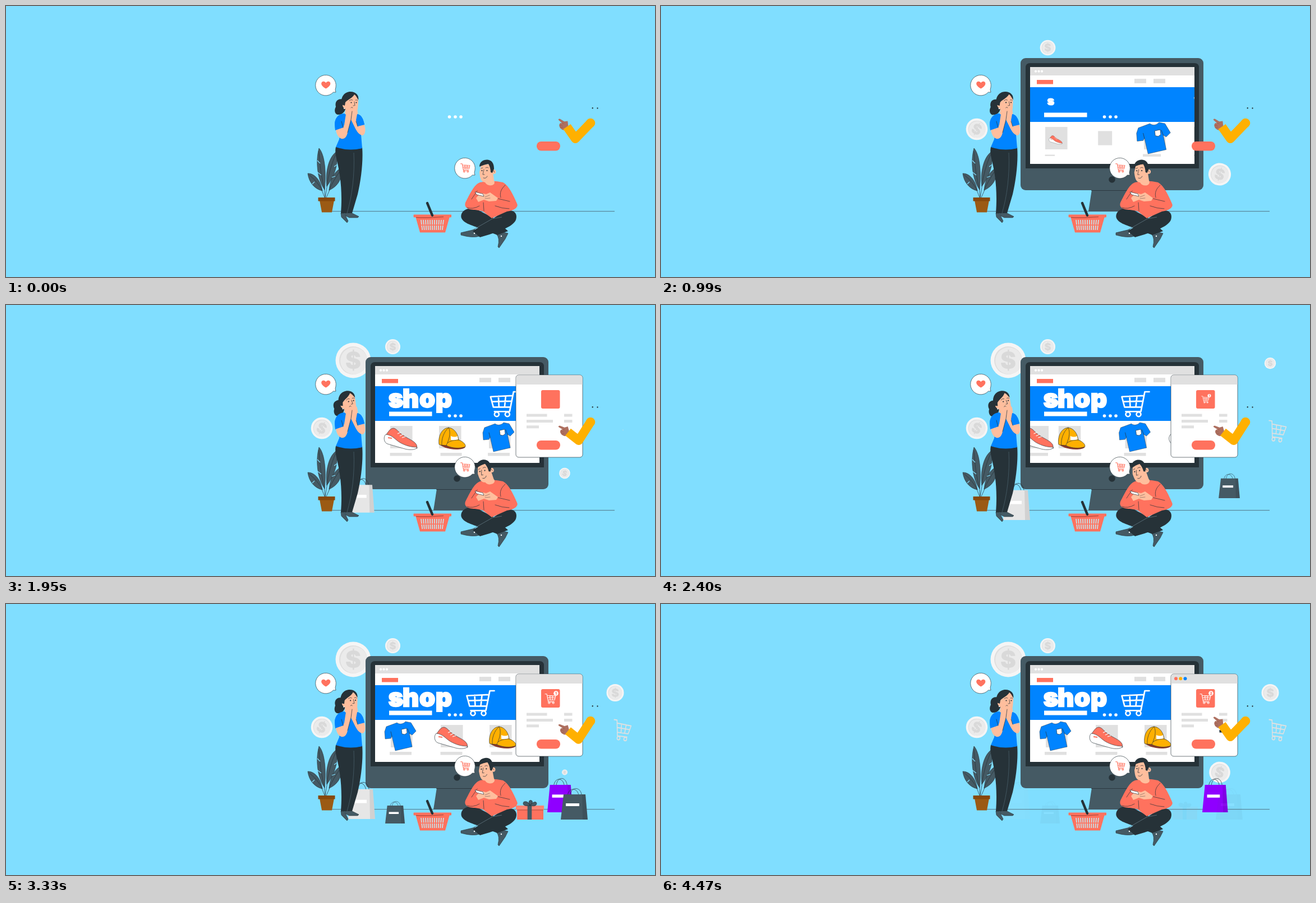
Recreate the animation shown at these times as an HTML page. Size 1157 by 484 pixels, loop 4.5 s.

```html
<!DOCTYPE html>
<html lang="en">
<head>
<meta charset="utf-8">
<title>Online shop</title>
<style>
html, body { margin: 0; width: 100%; height: 100%; overflow: hidden; background: #80deff; }
svg { display: block; width: 100vw; height: 100vh; }
.coral { fill: #ff725e; } .ink { fill: #263238; } .slate { fill: #455a64; } .blue { fill: #0084ff; }
.gold { fill: #ffb000; } .skin { fill: #ffbe9d; } .white { fill: #fff; } .grey { fill: #e0e0e0; }
.line { fill: none; stroke: #263238; stroke-width: .7; stroke-linecap: round; stroke-linejoin: round; }
.edge { stroke: #263238; stroke-width: .65; stroke-linejoin: round; }
.cart { fill: none; stroke-linejoin: round; stroke-linecap: round; }
text { font-family: Inter, "Open Sans", sans-serif; font-weight: 900; text-anchor: middle; }
#title { stroke: #fff; stroke-width: 2.4; }
</style>
</head>
<body>
<svg viewBox="0 0 1157 484" preserveAspectRatio="none">
<defs>
  <clipPath id="screenClip"><rect x="658" y="109" width="293" height="173"/></clipPath>
  <g id="cart">
    <path d="M0 2H8L15 38H42M10 9L49 11L44 30L14 30M22 10L24 30M35 10L34 30M11 19L46 20"/>
    <circle cx="19" cy="43" r="4"/><circle cx="38" cy="43" r="4"/>
  </g>
  <g id="coin">
    <circle r="31.5" fill="#f5f5f5"/><circle r="25" fill="#dedede"/><circle cx="1" cy=".6" r="24" fill="#ebebeb"/>
    <text y="15" font-size="42" fill="#d9d9d9">$</text>
  </g>
  <g id="bag">
    <path class="line" d="M12 12C14-3 30-3 32 12M17 10C19-4 35-4 37 10"/>
    <path d="M5 10H44L48 55H0Z" fill="currentColor"/>
    <path d="M38 10H44L48 55H39Z" opacity=".09"/>
    <rect class="white" x="9" y="26" width="24" height="5"/>
  </g>
  <g id="shoe">
    <rect class="grey" x="685" y="216" width="39.500" height="40"/>
    <rect id="tag0" class="grey" x="684.500" y="264" width="39" height="5.500"/>
    <g id="shoeArt">
      <path class="coral edge" d="M676 234C681 228 684 220 691 220C697 221 700 228 707 232C716 239 728 242 732 250L733 256L715 256L686 246Z"/>
      <path class="white edge" d="M677 231C672 236 674 246 680 248L711 257C722 260 732 258 733 254C722 254 712 251 703 246C694 241 689 232 677 231Z"/>
      <path d="M681 237L688 238" stroke="#ff725e" stroke-width="1.800"/>
      <path d="M698 230L704 227M702 234L708 231M706 237L712 235" stroke="#fff" stroke-width="1.100"/>
    </g>
  </g>
  <g id="cap">
    <rect id="tile1" class="grey" x="772" y="216" width="39.500" height="40"/>
    <rect id="tag1" class="grey" x="774.500" y="264" width="38" height="5.500"/>
    <g id="capArt">
      <path d="M774 250C788 260 813 260 819 254L806 247Z" fill="#8a3a2b"/>
      <path class="gold edge" d="M772 249C770 234 777 220 789 219C800 220 806 231 807 241C813 243 820 248 819 253C810 257 795 256 785 251C780 250 775 251 772 249Z"/>
      <path class="line" d="M789 219C780 227 776 240 777 250M789 219C793 226 791 237 787 246M785 251C785 244 797 241 807 241"/>
      <path class="white" d="M793 234Q800 237 805 234L806 240Q799 242 793 241Z"/>
    </g>
  </g>
  <g id="shirt">
    <rect class="grey" x="861" y="216" width="38.500" height="40"/>
    <rect id="tag2" class="grey" x="859" y="264" width="39" height="5.500"/>
    <g id="shirtArt">
      <path class="blue edge" stroke-opacity=".7" d="M853 219L872 212C877 216 884 214 887 210L897 212L906 227L899 234L894 231L899 255L869 262L863 236L861 240L851 241L850 228Z"/>
      <path class="line" d="M863 236L861 228M894 231L891 223"/>
      <path class="white edge" d="M880 224L889 222L890 230L886 233L881 232Z"/>
    </g>
  </g>
</defs>

<use id="coinBig" href="#coin"/><use id="coinTop" href="#coin"/><use id="coinLeft" href="#coin"/>
<use id="coinLow" href="#coin"/><use id="coinRight" href="#coin"/>
<path d="M580 366.700H1085" stroke="#455a64" stroke-width=".8"/>

<g id="monitor">
  <path class="slate" d="M768 328H840L846 367H762Z"/>
  <path d="M767 329.500H841" stroke="#263238" stroke-width=".8"/>
  <rect class="slate" x="641" y="93" width="326" height="236" rx="9"/>
  <path class="ink" d="M650 290V110Q650 102 658 102H951Q959 102 959 110V290Z"/>
  <circle class="ink" cx="804" cy="310" r="5.800"/>
</g>

<g id="page">
  <g clip-path="url(#screenClip)">
    <rect class="white" x="658" y="109" width="293" height="173"/>
    <rect class="grey" x="658" y="109" width="293" height="15"/>
    <g class="white"><circle cx="668" cy="116.700" r="2.100"/><circle cx="673.500" cy="116.700" r="2.100"/><circle cx="679" cy="116.700" r="2.100"/></g>
    <rect class="coral" x="670" y="132" width="29" height="7.500"/>
    <rect class="grey" x="844" y="130" width="21" height="8"/><rect class="grey" x="878" y="130" width="21" height="8"/>
    <rect class="blue" x="658" y="145" width="293" height="62"/>
    <g id="title" class="white" font-size="45"></g>
    <rect class="white" x="683" y="190.500" width="76.500" height="8"/>
    <g id="bannerCart"><use href="#cart" class="cart" stroke="#fff" stroke-width="2.700" transform="translate(870.500 153) scale(-1 .98)"/></g>
    <g id="shelf"></g>
  </g>
</g>
<g class="white"><circle cx="790.500" cy="198" r="2.800"/><circle cx="801" cy="198" r="2.800"/><circle cx="811" cy="198" r="2.800"/></g>

<g id="popup">
  <rect class="white edge" x="909" y="125" width="119" height="147" rx="5"/>
  <path class="grey" d="M909.500 142V130Q909.500 125.500 914 125.500H1023Q1027.500 125.500 1027.500 130V142Z"/>
  <circle id="dot0" class="coral" cx="918" cy="133.300" r="3"/>
  <circle id="dot1" class="gold" cx="926.300" cy="133.300" r="3"/>
  <circle id="dot2" class="blue" cx="934.500" cy="133.300" r="3"/>
  <rect class="coral" x="954" y="152" width="33.500" height="33" rx="3"/>
  <g id="order">
    <use href="#cart" class="cart" stroke="#fff" stroke-width="2.700" transform="translate(961 160) scale(.385)"/>
    <circle class="white" cx="980.500" cy="159.500" r="4.300"/>
    <text id="count" class="coral" x="980.500" y="161.800" font-size="6.500">1</text>
  </g>
  <path class="grey" d="M928 194.500h36.500v5H928zM928 205h47v5H928zM928 215.300h22v5H928zM995 194.500h14.500v5H995zM995 205h14.500v5H995z"/>
  <rect class="ink" x="995.500" y="225" width="14" height="4.500"/>
</g>
<rect class="coral" x="946" y="242" width="42" height="16.500" rx="8"/>

<g id="rightCart"><use href="#cart" class="cart" stroke="#e0e0e0" stroke-width="2.400" transform="translate(1084.500 205) rotate(8) scale(.64 .77)"/></g>
<g id="eyes" class="ink"><ellipse cx="1045.700" cy="182.300" rx="1.100" ry="1.200"/><ellipse cx="1054.500" cy="182.500" rx="1.100" ry="1.200"/></g>
<g id="hand">
  <path d="M1 -10L-5 -9L-13 -13.500Q-17 -13.500-15 -11L-9 -6L-12 -6Q-15 -3-13 1Q-11 5-6 6.500L3 4Z" fill="#ae7060"/>
  <path d="M-9 -6L-5 -5M-13 -2L-8 -2M-12 2L-7 1" fill="none" stroke="#8f5648" stroke-width=".6"/>
</g>
<path id="arm" fill="none" stroke="#ffb000" stroke-width="16" stroke-linejoin="round"/>
<circle class="gold" cx="1042" cy="209" r="8.300"/>

<g id="bagGrey" color="#e6e6e6"><use href="#bag" transform="translate(610 319) scale(1 1.180)"/></g>
<g id="bagSmall" color="#455a64"><use href="#bag" transform="translate(676 353) scale(.73 .71)"/></g>
<g id="bagPurple" color="#8f00ff"><use href="#bag" transform="translate(965 312) scale(.95 1.090)"/></g>
<g id="bagBig" color="#455a64"><use href="#bag" transform="translate(989 330)"/></g>
<g id="gift">
  <rect class="coral" x="913" y="366" width="43" height="19"/><rect x="911" y="362" width="46" height="6.500" fill="#ff8573"/>
  <rect x="913" y="368.500" width="43" height="1.500" opacity=".2"/>
  <rect class="slate" x="930" y="362" width="7" height="23"/>
  <path class="slate edge" d="M934 362C925 364 921 360 924 356C929 354 933 358 934 362C930 355 934 352 937 354C940 356 936 361 934 362C938 356 945 354 945 359C944 364 938 363 934 362Z"/>
</g>

<g id="plant">
  <path class="line" d="M567 322L569 342M573 318L569 342M561 324L568 342M579 324L571 342"/>
  <g class="slate edge">
    <path d="M558 254C569 266 571 300 568 328C556 312 551 280 558 254Z"/>
    <path d="M588 261C594 278 587 302 572 322C569 300 574 272 588 261Z"/>
    <path d="M538 299C551 299 561 312 564 330C550 327 540 315 538 299Z"/>
    <path d="M598 289C600 308 592 322 576 329C578 308 586 295 598 289Z"/>
  </g>
  <path class="line" d="M558 260Q560 300 568 328M587 266Q575 296 572 322M541 302Q556 314 564 330M596 294Q582 314 576 329"/>
  <path d="M555 276l5 5M554 296l8 6M592 282l-7 5M587 304l-6 2M546 318l4-4" stroke="#80deff" stroke-width="1.100"/>
  <path d="M559 347H585L581 368.500H563Z" fill="#9b5a14"/><rect x="556.500" y="342" width="30" height="6.500" fill="#87480c"/>
</g>

<g id="woman">
  <path class="slate edge" d="M597 370H603L610 384L608 387L598 377ZM604 370L615 369L629 376L627 378L612 378L606 375Z"/>
  <path class="ink" d="M588 252H635C637 278 633 310 627 336L617 370H597C600 330 596 300 589 272Q586 260 588 252Z"/>
  <path d="M620 262C622 300 617 340 608 370" fill="none" stroke="#455a64" stroke-width=".9"/>
  <g id="herHead">
    <path class="ink" d="M602 167C590 164 586 172 588 180C584 187 587 195 593 194C600 194 606 188 606 178Z"/>
    <path class="skin" d="M604 165L622 156Q629 160 628 172L627 184Q622 193 614 191L613 198H604L605 184Q599 181 600 174Z"/>
    <path class="ink" d="M598 176C596 162 604 153 614 153C624 153 630 160 628 168C626 164 624 160 621 158C617 165 609 167 605 172L604 178Z"/>
    <path class="line" d="M612 169Q615 166 618 168M623 168Q626 167 627 169M621 171L622 178L619 178M615 182Q617 179 618 182"/>
    <circle class="ink" cx="615.500" cy="172.500" r="1.100"/><circle class="ink" cx="624.500" cy="172.500" r="1.100"/>
    <circle class="white" cx="603" cy="183" r="1.100"/>
  </g>
  <path class="blue" d="M603 192C592 193 587 200 586 211L587 222L597 219L594 238L588 252Q611 260 635 254L632 218L639 212C637 200 632 194 626 193Q613 200 603 192Z"/>
  <path class="skin" d="M588 221L601 217L603 212L606 193Q607 184 613 182L617 186L615 203L609 226C607 235 603 238 598 237C592 235 589 228 588 221Z"/>
  <path class="skin" d="M627 214L638 211C642 219 641 229 636 231C630 231 625 224 621 215L615 203L617 186L621 178Q627 180 627 192L625 203Z"/>
  <path class="blue" d="M603 192C591 193 586 202 586 211L587 222L601 217L604 204ZM626 193C634 194 637 202 639 212L627 215L624 204Z"/>
  <path class="line" d="M609 226L615 203L617 188M601 217L598 206M627 215L624 206"/>
</g>

<g id="bubbles">
  <path class="white edge" d="M588 154L583.500 154A18.300 18.300 0 1 1 588 145Q586 150 588 154Z"/>
  <path class="coral" d="M570.300 147.500C559 141.500 561.500 134.500 566.300 134.700Q569.300 134.900 570.300 137.200Q571.300 134.900 574.300 134.700C579.100 134.500 581.600 141.500 570.300 147.500Z"/>
  <path class="white edge" d="M836 302L831.500 302A18.300 18.300 0 1 1 836 293Q834 298 836 302Z"/>
  <use href="#cart" class="cart" stroke="#ff725e" stroke-width="3.200" transform="translate(810.500 281) scale(.335)"/>
</g>

<g id="basket">
  <path class="coral" d="M730 376H791L783 404.500H738Z"/>
  <path id="slots" stroke="#c5e4ec" stroke-width="1.700"/>
  <rect class="coral" x="726.500" y="372.500" width="67.500" height="5" rx="1"/>
  <path d="M731 377.500Q745 379 780 376.500" fill="none" stroke="#b94e40" stroke-width="1.600"/>
  <path d="M751 352L760 374" stroke="#263238" stroke-width="4.500" stroke-linecap="round"/>
</g>

<g id="man">
  <path class="slate edge" d="M811 405L836 399L844 411Q832 415 811 409ZM876 402L895 406L890 416L879 432L877 430Q881 414 874 407Z"/>
  <path class="ink" d="M835 361C818 360 809 369 812 379C817 390 837 393 852 400L876 409L895 402L868 378Z"/>
  <path class="ink" d="M888 366C905 362 913 370 909 382C904 394 880 402 862 408L845 413L832 402L868 380Z"/>
  <path d="M832 400L867 380L884 377" fill="none" stroke="#5b707a" stroke-width=".9"/>
  <path class="coral" d="M845 315C834 319 827 336 819 351C816 360 824 364 836 364L849 366L866 379L893 367C908 365 914 358 911 353C905 339 897 321 886 315Q866 310 845 315Z"/>
  <path class="line" d="M830 345Q836 336 840 330M890 320C882 327 880 334 882 342M877 344L898 349M872 357Q885 362 897 362M851 351L852 366M822 360Q832 364 844 357"/>
  <path class="skin" d="M838 343L846 334L856 336L863 333L877 343L874 348L861 349L852 346L842 350Z"/>
  <path class="white edge" stroke-width=".5" d="M836 332L850 335.500L852 340L839 337Z"/>
  <path class="line" stroke-opacity=".6" d="M854 341L862 338M854 344L863 343"/>
  <g id="hisHead">
    <path class="skin" d="M847 284L864 282L868 296L870 312Q873 317 867 320Q858 322 854 315C846 314 845 306 844 297Z"/>
    <circle class="skin" cx="869.500" cy="296" r="4"/>
    <path class="ink" d="M844 287C844 279 850 274.500 858 274.500C866 275 870 281 870 291L867 298L864 297Q864 289 860 282Q853 283 844 287Z"/>
    <path class="line" d="M847 290L850 289M855 289Q858 287 860 289M852 292L850 301L853 301M851 307Q856 309 858 304M869 294L871 297"/>
    <circle class="ink" cx="848.500" cy="294" r="1.100"/><circle class="ink" cx="857.500" cy="294" r="1.100"/>
  </g>
  <circle class="white" cx="835" cy="406" r="1.200"/><circle class="white" cx="883" cy="411" r="1.200"/>
</g>
</svg>

<script>
const LOOP = 4500, DUR = 500;
const $ = id => document.getElementById(id);
const span = (t, start, dur = DUR) => Math.min(1, Math.max(0, (t - start) / dur));
const inOut = p => p < .5 ? 2 * p * p : 1 - 2 * (1 - p) ** 2;
const outCubic = p => 1 - (1 - p) ** 3;
const back = (p, c = 1.70158) => 1 + (c + 1) * (p - 1) ** 3 + c * (p - 1) ** 2;
const pop = (t, start, c) => t <= start ? 0 : back(span(t, start), c);
const set = (id, name, value) => $(id).setAttribute(name, value);
const scaleAt = (id, x, y, sx, sy = sx, dy = 0) => {
  $(id).style.visibility = sx > 0 && sy > 0 ? "visible" : "hidden";
  set(id, "transform", `translate(${x} ${y + dy}) scale(${sx} ${sy}) translate(${-x} ${-y})`);
};

// id, pivot x, pivot y, start
const POPS = [
  ["monitor", 804, 367, 12], ["page", 804.5, 195.5, 324],
  ["shirtArt", 878, 236, 640], ["shoeArt", 703.5, 239, 942], ["capArt", 795, 238, 1100],
  ["tile1", 791.5, 236, 905],
  ["rightCart", 1100, 223, 1945], ["order", 970, 168, 2300], ["gift", 934, 385, 3000],
  ["dot0", 918, 133.3, 3600], ["dot1", 926.3, 133.3, 3750], ["dot2", 934.5, 133.3, 3905]
];
const TAGS = [["tag0", 684.5, 935], ["tag1", 774.5, 1040], ["tag2", 859, 865]];
const DROPS = [
  ["popup", 968, 198, 1110], ["bagGrey", 638, 352, 1655],
  ["bagBig", 1013, 358, 2200], ["bagPurple", 987, 342, 2655]
];
// id, x, y, radius, tilt, start
const COINS = [
  ["coinBig", 619, 99, 31.5, 0, 1420], ["coinTop", 689.5, 74.5, 13.5, 0, 560],
  ["coinLeft", 563, 220, 19.3, 25, 495], ["coinLow", 996, 300.5, 18.8, 15, 620]
];
const LETTERS = [["s", 695, 930], ["h", 721.5, 1040], ["o", 751, 1130], ["p", 780.5, 1220]];
const SHELF = [["shoe", 76], ["cap", 0], ["shirt", 76]];
const STEP = 87.5, WRAP = 265;
const FADING = ["bagGrey", "bagSmall", "bagBig", "gift"];
const BLINKS = [700, 2780, 4260];

$("title").innerHTML = LETTERS.map(([ch, x]) => `<text id="letter-${ch}" x="${x}" y="183">${ch}</text>`).join("");
$("shelf").innerHTML = SHELF.map(([id]) =>
  `<g id="${id}Row"><use href="#${id}"/><use href="#${id}" x="${WRAP}"/></g>`).join("");
set("slots", "d", Array.from({ length: 11 }, (_, i) => {
  const x = 740 + i * 4, lean = (5 - i) * .45;
  return `M${x} 382l${lean * .45} 8.500m${lean * .08} 1.500l${lean * .45} 8`;
}).join(""));

function placeCoin(id, x, y, r, tilt, s) {
  $(id).style.visibility = s > 0 ? "visible" : "hidden";
  set(id, "transform", `translate(${x} ${y}) rotate(${tilt}) scale(${s * r / 31.5})`);
}

function drawArm(t) {
  const k = inOut(span(t, 1200, 450)) - inOut(span(t, 3250, 500));
  const mix = (a, b) => a + (b - a) * k;
  const wx = mix(1000, 1002), wy = mix(215.5, 227);
  set("arm", "d", `M${wx} ${wy}L${mix(1015, 1021)} ${mix(237, 242)}L1042 209`);
  set("hand", "transform", `translate(${wx} ${wy}) rotate(${mix(2, -8)})`);
}

function draw(t) {
  for (const [id, x, y, start] of POPS) scaleAt(id, x, y, pop(t, start));
  for (const [id, x, start] of TAGS) scaleAt(id, x, 266.7, pop(t, start));
  for (const [ch, x, start] of LETTERS) scaleAt("letter-" + ch, x, 171, pop(t, start));
  for (const [id, x, y, start] of DROPS) {
    const s = outCubic(span(t, start));
    scaleAt(id, x, y, s, s, -160 * (1 - s));
  }
  scaleAt("bagSmall", 693.5, 392, pop(t, 2575, 2.5), pop(t, 2665));

  for (const [id, x, y, r, tilt, start] of COINS) {
    let s = pop(t, start);
    if (id === "coinLow" && t > 1780) s = t < 3300 ? 1 - inOut(span(t, 1780, 350)) : pop(t, 3300);
    placeCoin(id, x, y, r, tilt, s);
  }
  const fall = outCubic(span(t, 2250));
  placeCoin("coinRight", 1086, 158.5 - 160 * (1 - fall), 15.5, 0, fall);

  set("bannerCart", "transform", `translate(${130 * (1 - outCubic(span(t, 1795)))} 0)`);
  for (const [id, delay] of SHELF) {
    const p = inOut(span(t, 2150 + delay, 400)) + inOut(span(t, 2708 + delay, 400));
    set(id + "Row", "transform", `translate(${-STEP * p} 0)`);
  }
  $("count").textContent = t < 3400 ? "1" : "2";

  const lean = -6.5 * (1 - Math.cos(2 * Math.PI * span(t, 700, 3170)));
  set("herHead", "transform", `rotate(${lean} 613 196)`);
  set("hisHead", "transform", `rotate(${lean} 863 314)`);
  drawArm(t);

  const blink = Math.max(...BLINKS.map(b => Math.sin(Math.PI * span(t, b, 140))));
  scaleAt("eyes", 1050, 182.4, 1, 1 - .7 * blink);
  for (const id of FADING) set(id, "opacity", 1 - span(t, 4100, 390));
}

const begin = performance.now();
function tick(now) {
  draw(Math.max(0, now - begin) % LOOP);
  requestAnimationFrame(tick);
}
draw(0);
requestAnimationFrame(tick);
</script>
</body>
</html>
```
